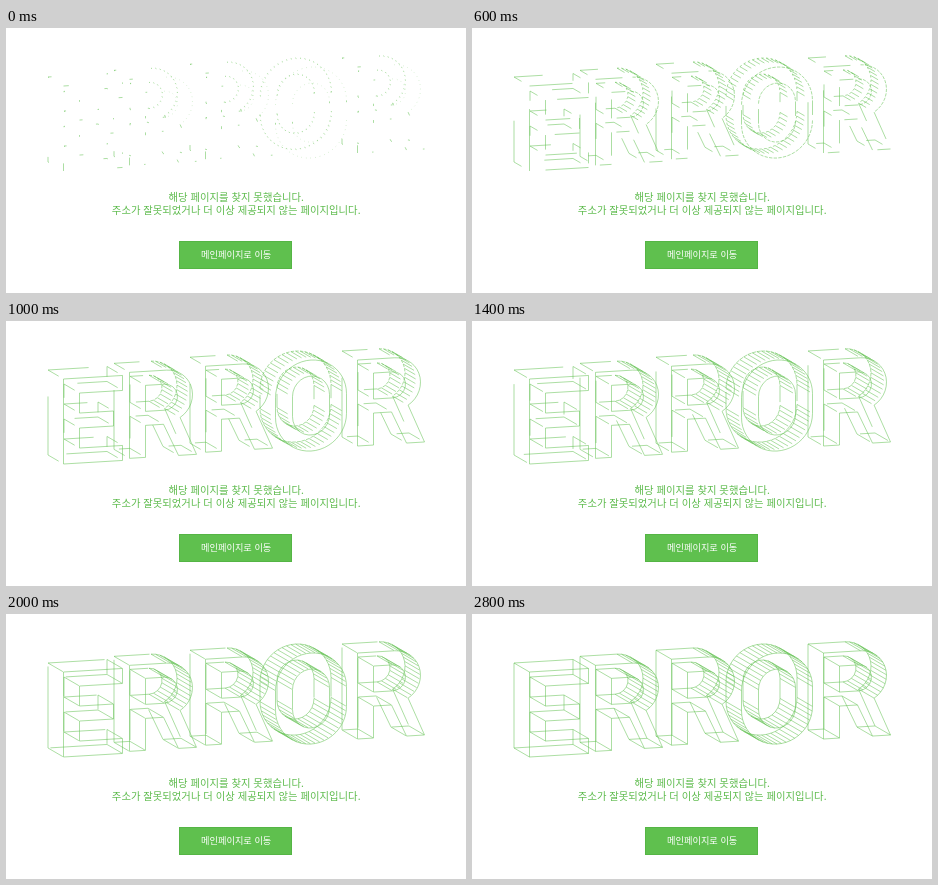
These frames come from a looping animation (460 by 265 pixels, 3700 ms). An HTML page with a canvas:

```html
<!DOCTYPE html>
<html lang="ko">
<head>
<meta charset="utf-8">
<title>ERROR</title>
<style>
  html, body { margin: 0; width: 100%; height: 100%; overflow: hidden; background: #fff; }
  canvas, svg { position: absolute; left: 0; top: 0; width: 460px; height: 265px; }
  text { font-family: "Noto Sans CJK KR", "Noto Sans CJK", sans-serif; text-anchor: middle; }
  .note { font-size: 10.35px; fill: #5dbb4c; }
  .label { font-size: 9.2px; font-weight: 500; fill: #fff; }
</style>
</head>
<body>
<canvas id="art"></canvas>
<svg viewBox="0 0 460 265">
  <text class="note" x="230.2" y="172.5">해당 페이지를 찾지 못했습니다.</text>
  <text class="note" x="230.2" y="186">주소가 잘못되었거나 더 이상 제공되지 않는 페이지입니다.</text>
  <rect x="173.5" y="213.5" width="112" height="27" fill="#5fc04e" stroke="#55b545"/>
  <text class="label" x="230.2" y="230">메인페이지로 이동</text>
</svg>
<script>
const LOOP = 3700, STEP = 100, DRAW = 2800;
const DEPTH = { x: 15.5, y: 9 };  // offset of the front face from the back face
const RIB = 4.6;                  // distance between the ribs on curved walls
const STEM = 16;                  // stroke width of the letters
const SLOPE = -.06;               // the word climbs to the right
const COLOR = '#5fc04e';

// Points on an elliptic arc, angles in quarter turns from the right, clockwise.
function arc(cx, cy, rx, ry, from, to) {
  const turn = (to - from) * Math.PI / 2;
  const n = Math.max(2, Math.round(Math.abs(turn) * (rx + ry) / 2 / RIB));
  return Array.from({ length: n + 1 }, (_, i) => {
    const a = from * Math.PI / 2 + turn * i / n;
    return [cx + rx * Math.cos(a), cy + ry * Math.sin(a)];
  });
}

// Upright oval with straight sides.
const oval = (cx, cy, rx, ry, side) => [
  ...arc(cx, cy - side, rx, ry - side, 2, 4),
  ...arc(cx, cy + side, rx, ry - side, 0, 2)
];

// Each glyph returns its closed contours.
const GLYPHS = {
  E() {
    const pts = [[0, 85], [0, 0]], bar = 15;
    for (let i = 0; i < 3; i++) {
      const y = i * 35, tip = i === 1 ? 50 : 59;
      if (i) pts.push([STEM, y]);
      pts.push([tip, y], [tip, y + bar]);
      if (i < 2) pts.push([STEM, y + bar]);
    }
    return [pts];
  },
  R() {
    const h = 86, foot = 67, r = 26, bowl = 37;
    return [
      [[0, h], [0, 0], ...arc(bowl, r, r, r, -1, .65), [foot, h], [foot - 18, h],
       [34, 54], [STEM, 54], [STEM, h]],
      [[STEM, 40], [STEM, 14], ...arc(bowl - 2, 27, 13, 13, -1, 1)]
    ];
  },
  O: () => [oval(35.5, 45.5, 35.5, 45.5, 10), oval(35.5, 45.5, 18.5, 29.5, 10)]
};

const lerp = (a, b, t) => a + (b - a) * t;
const LEFTS = [42, 108, 184, 254, 336];
const edges = [];

[...'ERROR'].forEach((letter, i) => {
  const ox = LEFTS[i];
  const u = (ox - LEFTS[0]) / (LEFTS[4] - LEFTS[0]);
  const oy = lerp(30, 49, Math.pow(1 - u, 1.7));
  for (const contour of GLYPHS[letter]()) {
    const back = contour.map(([x, y]) => [ox + x, oy + y + SLOPE * x]);
    const front = back.map(([x, y]) => [x + DEPTH.x, y + DEPTH.y]);
    back.forEach((p, k) => {
      const next = (k + 1) % back.length;
      edges.push({ a: p, b: back[next], speed: 1 });
      edges.push({ a: front[k], b: front[next], speed: 1.5 });
      edges.push({ a: p, b: front[k], speed: 1 });
    });
  }
});

const art = document.getElementById('art');
const ctx = art.getContext('2d');
const ratio = window.devicePixelRatio || 1;
art.width = 460 * ratio;
art.height = 265 * ratio;
ctx.scale(ratio, ratio);
ctx.strokeStyle = COLOR;
ctx.lineWidth = .52;

function draw(time) {
  const t = Math.min(Math.floor(time / STEP) * STEP, DRAW);
  const done = 1 - Math.pow(1 - (t + 70) / (DRAW + 70), 2.5);
  ctx.clearRect(0, 0, 460, 265);
  ctx.beginPath();
  for (const { a, b, speed } of edges) {
    const p = Math.min(1, done * speed);
    ctx.moveTo(a[0], a[1]);
    ctx.lineTo(lerp(a[0], b[0], p), lerp(a[1], b[1], p));
  }
  ctx.stroke();
}

const begin = performance.now();
function tick() {
  draw((performance.now() - begin) % LOOP);
  requestAnimationFrame(tick);
}
tick();
</script>
</body>
</html>
```
